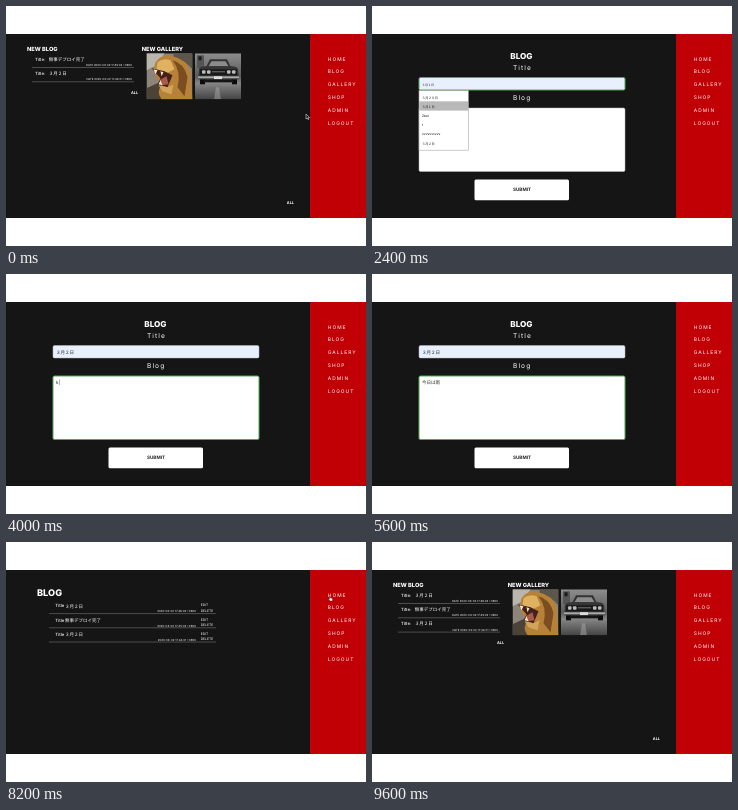
Animation, 360 px wide and 240 px high, one loop 10 s. Source, as an HTML page:

```html
<!DOCTYPE html>
<html lang="ja">
<head>
<meta charset="utf-8">
<title>Blog demo</title>
<style>
  html, body { margin: 0; width: 100%; height: 100%; overflow: hidden; background: #fff; }
  svg { display: block; width: 360px; height: 240px; }
  text {
    font-family: Inter, "Noto Sans CJK JP", "Noto Sans CJK", sans-serif;
    fill: #fff; white-space: pre; text-rendering: geometricPrecision;
  }
  .heavy { font-weight: 800; }
  .bold { font-weight: 700; }
  .mid { font-weight: 500; }
  .end { text-anchor: end; }
  .nav { letter-spacing: 1px; }
  .label { letter-spacing: 1.1px; }
  .ink { fill: #222; }
  .hint { fill: #555; }
  .rule { stroke: #858585; stroke-width: .5; }
</style>
</head>
<body>
<svg id="stage" viewBox="0 0 360 240" xmlns="http://www.w3.org/2000/svg"></svg>
<script>
const STEP = 200, LOOP = 10000, LAST = 48;
const DAY = "３月２日", DEPLOY = "無事デプロイ完了";
const OPTIONS = ["３月２８日", "３月１日", "Zbel", "t", "vvvvvvvvvv", DAY];

// First step at which each text stands in the blog field
const TYPED = [
  [20, "k"], [21, "きょ"], [22, "きょう"], [23, "今日"], [25, "今日h"], [26, "今日は"],
  [27, "今日はあ"], [28, "今日は雨"], [29, "今日は雨・・"], [30, "今日は雨・・・"]
];

// Pointer runs: step, x, y
const RUNS = [
  [[0, 300, 108], [1, 305, 99], [2, 316, 79], [3, 320.5, 67], [5, 320.5, 67], [9, 120, 78]],
  [[31, 150, 128], [34, 139.3, 180], [36, 139.3, 180], [40, 323.5, 54], [44, 323.5, 54], [47, 312, 66]]
];

const text = (x, y, size, str, cls = "") =>
  `<text x="${x}" y="${y}" font-size="${size}" class="${cls}">${str}</text>`;
const rect = (x, y, w, h, fill, more = "") =>
  `<rect x="${x}" y="${y}" width="${w}" height="${h}" fill="${fill}" ${more}/>`;
const path = (d, fill, more = "") => `<path d="${d}" fill="${fill}" ${more}/>`;
const rule = (x1, x2, y) => `<path class="rule" d="M${x1} ${y}H${x2}"/>`;
const group = (id, body) => `<g id="${id}">${body}</g>`;
const stamp = time => `2020-03-02 ${time} +0900`;

const posts = [[DAY, "17:46:02"], [DEPLOY, "17:45:02"], [DAY, "17:44:01"]];

const animal = `<g transform="translate(140.5 47.3)" clip-path="url(#tile)">
  ${rect(0, 0, 46, 46, "#8d8579")}
  ${path("M0 0H18L10 12L0 17Z", "#b9b6ad")}
  ${path("M27 0H46V16Q38 7 27 4Z", "#5d564b")}
  ${path("M0 46V35L13 29L24 46Z", "#4b4238")}
  ${path("M9 9Q15 0 26 3Q40 6 44 18L46 46H15Q9 38 16 31Q5 22 9 9Z", "#b78238")}
  ${path("M26 7Q38 10 41 24L38 43L31 34Q35 18 26 7Z", "#7b4d20")}
  ${path("M11 9Q17 4 24 7L28 16L20 20L10 16Z", "#dfb261")}
  ${path("M5 15L18 18L26 22L21 34L11 31L14 25Z", "#47201a")}
  ${path("M13 27L20 23L22 31L15 32Z", "#a95b4b")}
  ${path("M7 16L11 17L9 21ZM14 18L17 19L15 23ZM12 31L14 27L16 32Z", "#f0e4c8")}
  ${path("M12 32L21 34L27 31L25 41L16 38Z", "#d2a35a")}
</g>`;

const car = `<g transform="translate(189 47.3)" clip-path="url(#tile)">
  ${rect(0, 0, 46, 46, "url(#street)")}
  ${rect(2, 2, 7, 13, "#555")}${rect(3.5, 3, 3, 4, "#1b1b1b")}
  ${path("M11 14L15 6H32L36 14Z", "#343434")}
  ${path("M13.5 13L16.5 8H30.5L33.5 13Z", "#8c8c8c")}
  ${path("M4 16Q5 13 10 13H37Q42 13 43 16L44 26H3Z", "#363636")}
  ${rect(5, 16, 37, 6, "#191919")}
  ${[7, 12, 32, 37].map(x => rect(x, 17, 3.5, 3.5, "#bbb", 'rx="1"')).join("")}
  ${rect(17, 18, 13, 1, "#777")}
  ${rect(3, 23, 41, 2, "#aaa")}
  ${rect(19, 23, 8, 3, "#ddd")}
  ${rect(5, 26, 5, 5, "#0b0b0b")}${rect(37, 26, 5, 5, "#0b0b0b")}
  ${rect(9, 26, 29, 3, "#151515")}
  ${path("M21 34H24L26 46H19Z", "#a5a5a5", 'opacity=".5"')}
</g>`;

const homePost = ([title, time], i) => {
  const y = 14.3 * i;
  return text(29, 54.6 + y, 4.3, "Title:", "mid") + text(42.7, 54.8 + y, 4.5, title) +
    text(126, 60 + y, 2.8, "DATE " + stamp(time), "end") + rule(26, 128, 61.5 + y);
};

const homeList = (id, list) => group(id,
  list.map(homePost).join("") + text(125, 59.5 + 14.3 * list.length, 3.8, "ALL", "bold"));

const indexPost = ([title, time], i) => {
  const y = 14.2 * i;
  return text(49.3, 65.4 + y, 4.3, "Title", "mid") + text(59, 65.6 + y, 4.5, title) +
    text(190, 70.3 + y, 2.85, stamp(time), "end") +
    text(194.7, 64.3 + y, 3.35, "EDIT") + text(194.7, 70 + y, 3.35, "DELETE") +
    rule(43, 210, 71.6 + y);
};

const nav = ["HOME", "BLOG", "GALLERY", "SHOP", "ADMIN", "LOGOUT"]
  .map((name, i) => text(321.8, 54.6 + 12.8 * i, 4.9, name, "nav")).join("");

const home = group("home",
  text(21, 45.2, 5.7, "NEW BLOG", "heavy") +
  text(135.7, 45.2, 5.7, "NEW GALLERY", "heavy") +
  homeList("before", posts.slice(1)) + homeList("after", posts) +
  animal + car + text(280.8, 197.5, 3.8, "ALL", "bold"));

const form = group("form",
  text(138.2, 53.2, 8.2, "BLOG", "heavy") +
  text(141, 64.1, 6.6, "Title", "label") + text(141, 94.3, 6.6, "Blog", "label") +
  rect(47, 71.5, 206, 12.5, "#fff", 'id="titleBox" rx="1.5"') +
  rect(47, 102, 206, 63.5, "#fff", 'id="blogBox" rx="1.5"') +
  text(50, 79.5, 4.1, "", "ink").replace("<text", '<text id="titleText"') +
  text(50, 109.5, 4.1, "", "ink").replace("<text", '<text id="blogText"') +
  rect(102.5, 173.5, 94.5, 20.8, "#fff", 'rx="1.5"') +
  text(141, 185.4, 4.6, "SUBMIT", "bold ink") +
  group("menu",
    rect(47, 84.5, 49.3, 59.7, "#fff", 'stroke="#aaa" stroke-width=".6"') +
    rect(47.2, 95.3, 48.9, 9.3, "#b9b9b9", 'id="pick"') +
    OPTIONS.map((o, i) => text(50, 92.6 + 9.2 * i, 3.2, o, "ink mid")).join("")));

const index = group("index",
  text(31, 54, 9.2, "BLOG", "heavy") + posts.map(indexPost).join(""));

const pointer = group("pointer",
  path("M0 0V5L1.2 4L2 5.6L2.9 5.2L2.1 3.6H3.6Z", "#111",
    'id="arrow" stroke="#fff" stroke-width=".5"') +
  path("M0 .4Q.6-.4 1 .4V2L3 2.5Q3.4 4 2.6 5H.5L-1 3L0 3Z", "#fff",
    'id="hand" stroke="#222" stroke-width=".4"'));

document.getElementById("stage").innerHTML = `<defs>
  <clipPath id="tile"><rect width="46" height="46"/></clipPath>
  <linearGradient id="street" x2="0" y2="1">
    <stop stop-color="#8e8e8e"/><stop offset=".5" stop-color="#5c5c5c"/>
    <stop offset=".65" stop-color="#858585"/><stop offset="1" stop-color="#444"/>
  </linearGradient></defs>` +
  rect(0, 28, 304, 184, "#151515") + rect(304, 28, 56, 184, "#c10006") +
  nav + home + form + index + pointer;

const $ = id => document.getElementById(id);
const show = (id, on) => $(id).setAttribute("display", on ? "inline" : "none");
const set = (id, attrs) => {
  for (const key in attrs) $(id).setAttribute(key, attrs[key]);
};

function field(name, value, hint, size, focus, fill) {
  const el = $(name + "Text");
  el.textContent = value || hint;
  set(name + "Text", { class: value ? "ink" : "hint", "font-size": value ? size : 4.1 });
  set(name + "Box", {
    fill, stroke: focus ? "#52a852" : "#bbb", "stroke-width": focus ? 1 : .5
  });
}

function drawForm(n) {
  const open = n >= 10 && n < 17;
  const row = open ? n - 11 : -1;
  const title = n >= 17 ? DAY : row >= 0 ? OPTIONS[row] : "";
  field("title", title, "TITLE", open ? 3 : 4.5, n >= 9 && n < 18, title ? "#e8f0fe" : "#fff");

  const typed = TYPED.filter(([from]) => from <= n).pop();
  const writing = n >= 18 && n < 33;
  field("blog", typed ? typed[1] + (n === 20 ? "|" : "") : "", "BLOG", 4.5, writing, "#fff");

  show("menu", open);
  show("pick", row >= 0);
  set("pick", { y: 86.1 + 9.2 * row });
}

function drawPointer(n) {
  const run = RUNS.find(r => n >= r[0][0] && n <= r[r.length - 1][0]);
  show("pointer", run);
  if (!run) return;
  const i = Math.max(1, run.findIndex(k => k[0] >= n));
  const [a, b] = [run[i - 1], run[i]];
  const p = (n - a[0]) / (b[0] - a[0]);
  const x = a[1] + (b[1] - a[1]) * p, y = a[2] + (b[2] - a[2]) * p;
  set("pointer", { transform: `translate(${x} ${y})` });
  show("hand", x > 320);
  show("arrow", x <= 320);
}

function draw(n) {
  const page = n < 3 || n >= 42 ? "home" : n < 36 ? "form" : "index";
  for (const id of ["home", "form", "index"]) show(id, id === page);
  show("before", n < 3);
  show("after", n >= 42);
  drawForm(n);
  drawPointer(n);
}

let shown = -1;
const start = performance.now();
function tick() {
  const t = (performance.now() - start) % LOOP;
  const n = Math.min(LAST, Math.floor(t / STEP));
  if (n !== shown) draw(shown = n);
  requestAnimationFrame(tick);
}
tick();
</script>
</body>
</html>
```
